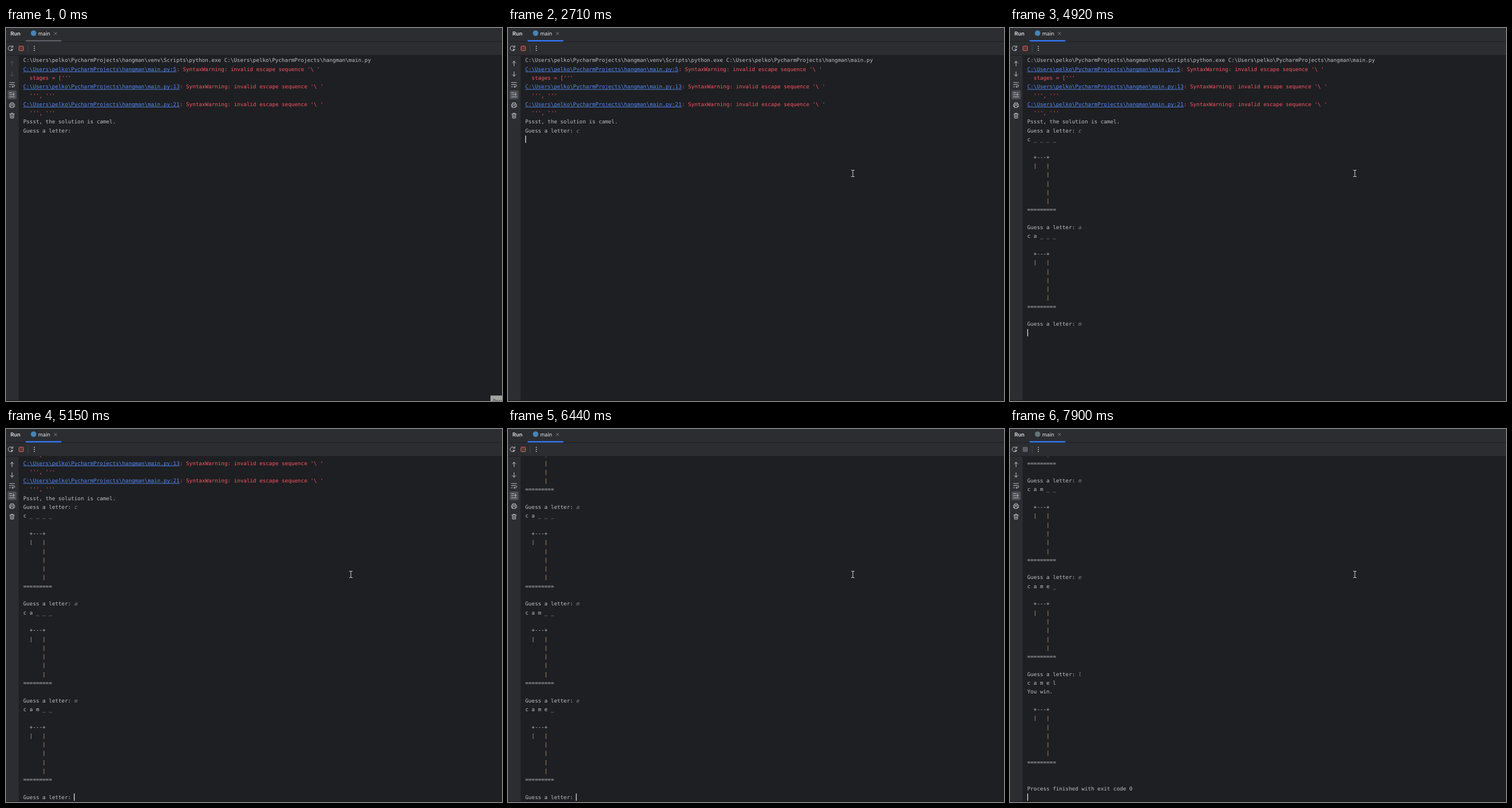
Write an HTML page that moves like this. It is 863 by 649 pixels and loops after 8 s.

```html
<!DOCTYPE html>
<html lang="en">
<head>
<meta charset="utf-8">
<title>Hangman console</title>
<style>
  html, body { margin: 0; width: 100%; height: 100%; overflow: hidden; background: #1e1f22; }
  svg { display: block; width: 863px; height: 649px; }
  text { white-space: pre; text-rendering: geometricPrecision; }
  .ui { font: 9.25px Inter, sans-serif; fill: #dfe1e5; }
  #log text { font: 9.227px "DejaVu Sans Mono", monospace; fill: #bcbec4; }
  #log .err { fill: #f75464; }
  #log .link { fill: #548af7; }
  #log .key { fill: #7f8288; font-style: italic; }
  #log .bar { fill: #cba97c; }
  .icon { fill: none; stroke: #ced0d6; stroke-width: .9; stroke-linecap: round; stroke-linejoin: round; }
</style>
</head>
<body>
<svg viewBox="0 0 863 649">
  <defs><clipPath id="pane"><rect x="22" y="48" width="841" height="600"/></clipPath></defs>
  <rect width="863" height="649" fill="#1e1f22"/>
  <rect width="863" height="47" fill="#2b2d30"/>
  <rect y="48" width="22" height="600" fill="#2b2d30"/>
  <rect y="23" width="863" height="1" fill="#1e1f22"/>
  <rect y="648" width="863" height="1" fill="#21171b"/>

  <text class="ui" x="7.8" y="12.8" font-weight="600" style="font-weight:600">Run</text>
  <circle id="logo" cx="48" cy="9" r="4.8"/>
  <text class="ui" x="56" y="12.8">main</text>
  <path class="icon" d="M83.8 7.3l4.6 4.6m0-4.6l-4.6 4.6" style="stroke:#868a91"/>
  <rect id="tab" x="34" y="21" width="62.5" height="2.4" rx="1.2"/>

  <path class="icon" d="M11.2 32.6A4.2 4.2 0 1 0 12 36.6M12 30.6v2.9h-2.9M9.4 39.4l2.6-1.6-2.6-1.4z"/>
  <rect id="stop" x="22.5" y="31.5" width="8" height="8" rx="1.2"/>
  <rect x="38" y="29" width="1" height="13" fill="#43454a"/>
  <g fill="#ced0d6"><circle cx="49.3" cy="31.9" r=".9"/><circle cx="49.3" cy="35.4" r=".9"/><circle cx="49.3" cy="38.9" r=".9"/></g>

  <path id="arrows" class="icon" d="M10.5 65.8v-8M7.3 61l3.2-3.2 3.2 3.2M10.5 76v8M7.3 80.800l3.2 3.2 3.2-3.2"/>
  <path class="icon" d="M6 95h9M6 98.500h7.300a1.800 1.800 0 0 1 0 3.700h-2.800M12 100.600l-1.600 1.600 1.600 1.600M6 102.200h2"/>
  <rect x="2.500" y="108.500" width="16" height="15.500" rx="2.500" fill="#4b4d53"/>
  <path class="icon" d="M6 112.500h4M6 116h4M6 119.800h9M13 112v5M11.200 115.400l1.800 1.800 1.800-1.800"/>
  <path class="icon" d="M8 132.500v-2.500h5v2.500M7.800 136.800h-1.600v-4.200h8.700v4.200h-1.600M8 135h5v3.300h-5z"/>
  <path class="icon" d="M6.500 149.800h8M9 149.500v-1.300h3v1.300M7.400 150l.5 6.800h5.200l.5-6.800M9.500 152v3M11.500 152v3"/>

  <g clip-path="url(#pane)"><g id="log"></g></g>
  <rect id="caret" width="1.4" height="12.600" fill="#ced0d6"/>
  <g id="tip">
    <rect x="843" y="639.500" width="21" height="10" fill="#a3a5a0"/>
    <text class="ui" x="847" y="652" style="fill:#33353a;font-size:8.500px">Resume</text>
  </g>
  <g id="mouse" fill="none" stroke-linecap="round">
    <path d="M-2.500-5.500h1.800L0-5 .7-5.500h1.800M0-5V5M-2.500 5.500h1.800L0 5l.7.5h1.800" stroke="#d6d6d6"/>
  </g>
</svg>
<script>
const LOOP = 8000, CELL = 5.555, ROW = 15.3, LEFT = 30, TOP = 56, BOTTOM = 640.6;
const $ = id => document.getElementById(id);
const esc = s => s.replace(/&/g, "&amp;").replace(/</g, "&lt;");
const run = (s, cls = "") => ({ s, cls });

const dir = String.raw`C:\Users\pelko\PycharmProjects\hangman` + "\\";
const warn = n => [run(dir + "main.py:" + n, "link"), run(": SyntaxWarning: invalid escape sequence '\\ '", "err")];
const quotes = [run("  ''', '''", "err")];
const PROMPT = "Guess a letter: ";
const intro = [
  [run(dir + String.raw`venv\Scripts\python.exe ` + dir + "main.py")],
  warn(5), [run("  stages = ['''", "err")],
  warn(13), quotes, warn(21), quotes,
  [run("Pssst, the solution is camel.")],
  [run(PROMPT)]
];

const post = "      |";
const gallows = ["", "  +---+", "  |   |", post, post, post, post, "========="]
  .map(s => [run(s, s.includes("|") ? "bar" : "")]);

// typed, entered, answer begins, answer complete, number of steps
const WORD = "camel";
const rounds = [
  [2430, 2710, 2910, 2910, 1],
  [3310, 3550, 3780, 3780, 1],
  [4740, 4920, 5150, 5150, 1],
  [5780, 6170, 6370, 6440, 3],
  [7280, 7550, 7790, 7900, 4]
];

function answer(i) {
  const shown = [...WORD].map((c, k) => k <= i ? c : "_").join(" ");
  const last = i === WORD.length - 1;
  const tail = last
    ? ["", "", "Process finished with exit code 0", ""]
    : ["", PROMPT];
  return [
    [run(shown)],
    ...(last ? [[run("You win.")]] : []),
    ...gallows,
    ...tail.map(s => [run(s)])
  ];
}

function linesAt(t) {
  const lines = intro.slice();
  rounds.forEach(([typed, entered, from, to, steps], i) => {
    if (t < typed) return;
    lines[lines.length - 1] = [run(PROMPT), run(WORD[i], "key")];
    if (t < entered) return;
    if (t < from) { lines.push([run("")]); return; }
    const out = answer(i);
    const gap = (to - from) / Math.max(1, steps - 1);
    const step = gap ? Math.min(steps, 1 + Math.floor((t - from) / gap + 1e-6)) : steps;
    lines.push(...out.slice(0, Math.ceil(out.length * step / steps)));
  });
  return lines;
}

const width = line => line.reduce((n, r) => n + r.s.length, 0);

function renderLine(line, y) {
  let col = 0, html = "";
  for (const { s, cls } of line) {
    const x = LEFT + col * CELL;
    html += `<text class="${cls}" x="${x}" y="${y + 3.3}">${esc(s)}</text>`;
    if (cls === "link")
      html += `<rect x="${x}" y="${y + 4.5}" width="${s.length * CELL}" height=".9" fill="#548af7"/>`;
    col += s.length;
  }
  return html;
}

let drawn = "";
function drawLog(t) {
  const lines = linesAt(t), end = lines.length - 1, last = lines[end];
  const scroll = Math.max(0, TOP + ROW * end - BOTTOM);
  const rowY = i => TOP + ROW * i - scroll;
  const key = lines.length + ":" + width(last);
  if (key !== drawn) {
    drawn = key;
    $("log").innerHTML = lines
      .map((l, i) => rowY(i) < 38 ? "" : renderLine(l, rowY(i))).join("");
  }
  const off = t < 1800 || (t >= 4610 && t < 4740) || (t >= 7070 && t < 7280);
  $("caret").setAttribute("x", Math.floor(LEFT + width(last) * CELL));
  $("caret").setAttribute("y", rowY(end) - 6.4);
  $("caret").setAttribute("opacity", off ? 0 : 1);
}

function mouseAt(t) {
  if (t < 20) return [900, 690];
  if (t < 1560) {
    const u = Math.min(1, (1 + Math.floor((t - 20) / 26)) / 14);
    const e = 1 - (1 - u) ** 2;
    return [872 - 277 * e, 655 - 400 * e];
  }
  const path = [[596.5, 255], [600, 254], [602, 253.5], [601, 253], [600, 253]];
  return path[Math.min(4, Math.floor((t - 1560) / 60))];
}

function draw(t) {
  drawLog(t);
  const done = t >= 7590;
  $("logo").setAttribute("fill", done ? "#64757a" : "#4584b8");
  $("stop").setAttribute("fill", done ? "#5a5d63" : "#5e3838");
  $("stop").setAttribute("stroke", done ? "#5a5d63" : "#db5c5c");
  $("tab").setAttribute("fill", t < 1740 ? "#5a5d63" : "#3574f0");
  $("arrows").style.stroke = t < 20 ? "#54575c" : "#ced0d6";
  $("tip").setAttribute("opacity", t < 20 ? 1 : 0);
  $("mouse").setAttribute("transform", `translate(${mouseAt(t)})`);
}

const start = performance.now();
function tick() {
  draw((performance.now() - start) % LOOP);
  requestAnimationFrame(tick);
}
draw(0);
requestAnimationFrame(tick);
</script>
</body>
</html>
```
